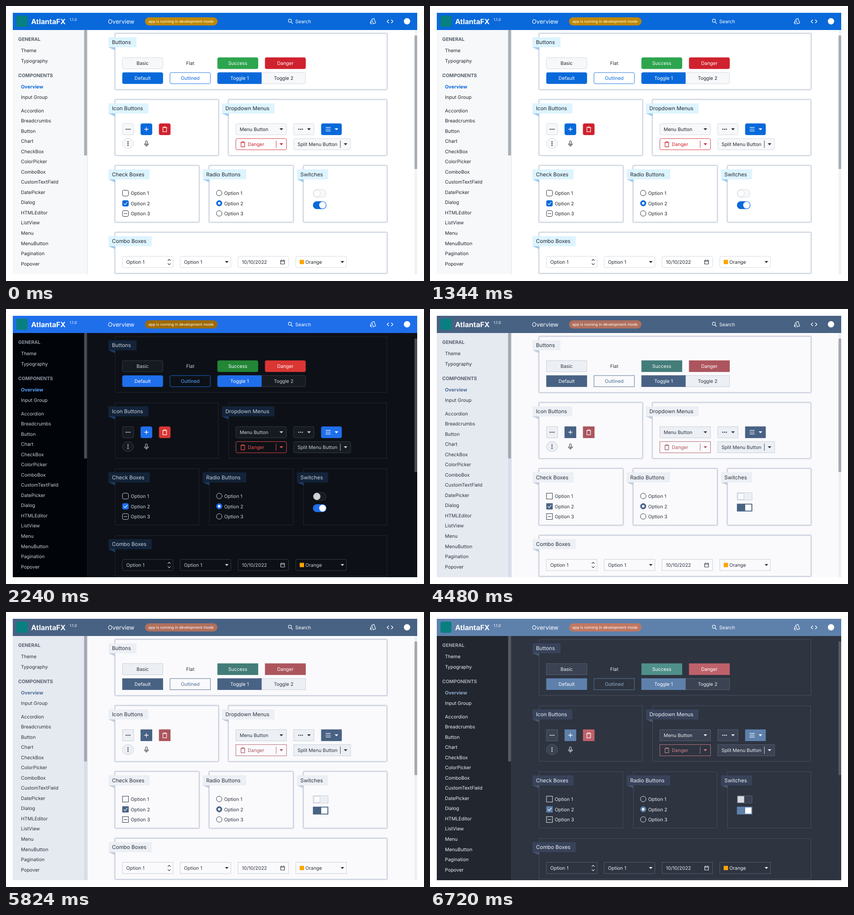
These frames come from a looping animation (923 px wide and 607 px high, 8960 ms). An HTML page:

```html
<!DOCTYPE html>
<html lang="en">
<head>
<meta charset="utf-8">
<title>Theme showcase</title>
<style>
html, body { margin: 0; width: 100%; height: 100%; overflow: hidden; background: #fff; }
svg { display: block; width: 923px; height: 607px; }
text { font-family: Inter, "Noto Sans", sans-serif; font-size: 10.5px; fill: var(--fg); text-rendering: geometricPrecision; white-space: pre; }
rect.ctl { rx: var(--r); }
.card { fill: var(--bg); stroke: var(--cardLine); filter: drop-shadow(0 0 1.5px var(--shadow)); }
</style>
</head>
<body>
<svg id="stage" viewBox="0 0 923 607" xmlns="http://www.w3.org/2000/svg"></svg>
<script>
const NS = 'http://www.w3.org/2000/svg';
const HOLD = 2240;
const stage = document.getElementById('stage');
const v = name => `var(--${name})`;

const themes = [
  { bg: '#ffffff', side: '#f6f8fa', sideTrack: '#f6f8fa', line: '#d0d7de', divider: '#d8dee4',
    fg: '#24292f', muted: '#57606a', head: '#0969da', accent: '#0969da', accentFg: '#0969da',
    ok: '#2da44e', bad: '#cf222e', badFg: '#cf222e', badge: '#bf8700', btn: '#f6f8fa',
    tag: '#ddf4ff', fold: '#9cc8ee', cardLine: '#cbd3df', shadow: '#8798b3', thumb: '#a9afb5',
    track: '#f0f2f4', knob: '#ffffff', knobLine: '#d0d7de', r: '3px', round: true },
  { bg: '#0d1117', side: '#010409', sideTrack: '#010409', line: '#3a4049', divider: '#21262d',
    fg: '#c9d1d9', muted: '#8b949e', head: '#1f6feb', accent: '#1f6feb', accentFg: '#58a6ff',
    ok: '#238636', bad: '#da3633', badFg: '#f85149', badge: '#9e6a03', btn: '#161b22',
    tag: '#132339', fold: '#1c3c69', cardLine: '#262b32', shadow: 'transparent', thumb: '#484c53',
    track: '#0d1117', knob: '#d0d1d3', knobLine: '#d0d1d3', r: '3px', round: true },
  { bg: '#fafafc', side: '#e5e9f0', sideTrack: '#d8dee9', line: '#c3cad6', divider: '#d8dee9',
    fg: '#2e3440', muted: '#5a6373', head: '#486284', accent: '#486284', accentFg: '#4c6a94',
    ok: '#437c78', bad: '#ac555d', badFg: '#ac555d', badge: '#b0705d', btn: '#eceff4',
    tag: '#eceff4', fold: '#c1cbdc', cardLine: '#c5cddd', shadow: '#8795b2', thumb: '#a3a8b1',
    track: '#eceff4', knob: '#fafafc', knobLine: '#c3cad6', r: '0px', round: false },
  { bg: '#2e3440', side: '#22262f', sideTrack: '#22262f', line: '#5a6477', divider: '#3b4252',
    fg: '#eceff4', muted: '#a5abb6', head: '#5e81ac', accent: '#5e81ac', accentFg: '#8daccf',
    ok: '#50908a', bad: '#bf616a', badFg: '#d08088', badge: '#c07762', btn: '#3b4252',
    tag: '#38435a', fold: '#49566d', cardLine: '#495265', shadow: 'transparent', thumb: '#565b66',
    track: '#2e3440', knob: '#d8dadd', knobLine: '#d8dadd', r: '0px', round: false }
];

let parent = stage;

function el(tag, attrs) {
  const node = document.createElementNS(NS, tag);
  for (const key in attrs) node.setAttribute(key, attrs[key]);
  parent.appendChild(node);
  return node;
}
const rect = (x, y, width, height, fill, more) => el('rect', { x, y, width, height, fill, ...more });
const dot = (cx, cy, r, fill, more) => el('circle', { cx, cy, r, fill, ...more });
const path = (d, stroke, more) => el('path', { d, fill: 'none', stroke, 'stroke-width': 1.1, ...more });
const shape = (d, fill) => el('path', { d, fill });

// Text placed by the middle of its capitals.
function label(str, x, cy, fill, size = 10.5, more = {}) {
  const node = el('text', { x, y: cy + size * 0.364, ...more });
  node.style.fontSize = size + 'px';
  node.style.fill = fill || v('fg');
  node.textContent = str;
}
const centred = (str, x, cy, fill) => label(str, x, cy, fill, 10.5, { 'text-anchor': 'middle' });

function control(x, y, w, fill, line, h = 25.5) {
  return rect(x + 0.4, y + 0.4, w - 0.8, h - 0.8, fill, { class: 'ctl', stroke: line || fill, 'stroke-width': 0.9 });
}
function button(str, x, y, fill, line, color) {
  control(x, y, 90, fill, line);
  centred(str, x + 45, y + 12.8, color);
}
const arrow = (x, y, fill = v('fg')) => shape(`M${x - 4} ${y - 2}h8l-4 4.2z`, fill);

function dots(x, y, vertical) {
  for (const k of [-4, 0, 4]) dot(vertical ? x : x + k, vertical ? y + k : y, 1.25, v('fg'));
}
function trash(x, y, color) {
  path(`M${x - 5.2} ${y - 3.6}h10.4M${x - 2} ${y - 3.8}v-1.7h4v1.7M${x - 4} ${y - 3.4}v9h8v-9`, color, { 'stroke-width': 1.2 });
}

function card(title, x, y, w, h, tagWidth) {
  rect(x, y, w, h, '', { class: 'card', 'stroke-width': 0.9 });
  shape(`M${x - 15} ${y + 30}h15v6.5z`, v('fold'));
  rect(x - 14.7, y + 8, tagWidth, 22.2, v('tag'));
  label(title, x - 7, y + 19, v('fg'), 11.6);
}

function drawHeader() {
  rect(15, 15, 893, 38, v('head'));
  rect(23, 21.3, 24.5, 24.7, '#087f80', { rx: 4 });
  label('AtlantaFX', 55.5, 34, '#fff', 15.75, { 'font-weight': 700 });
  label('1.1.0', 140.5, 30.2, '#fff', 8.4);
  label('Overview', 225, 34, '#fff', 13.125);
  rect(307, 25, 160, 18, v('badge'), { rx: 9 });
  label('app is running in development mode', 314.3, 34, '#fff', 8.4);
  dot(626.8, 32.6, 3.4, 'none', { stroke: '#fff', 'stroke-width': 1.2 });
  path('M629.3 35.2l3.7 3.7', '#fff', { 'stroke-width': 1.3 });
  label('Search', 638.7, 34, '#fff');
  path('M807.5 29.2l5.2-1.6 3.4 9.8-5.2 1.9zM806 31.2v8.2l2.2.6M804.5 35v3.6', '#fff', { 'stroke-width': 1.2 });
  path('M845.4 30.2l-3.8 3.8 3.8 3.8M850.6 30.2l3.8 3.8-3.8 3.8', '#fff', { 'stroke-width': 1.4 });
  dot(885.5, 33.7, 7, '#fff');
}

function drawSidebar() {
  rect(15, 53, 165, 539, v('side'));
  rect(172.5, 53, 7.5, 539, v('sideTrack'));
  rect(179.3, 53, 0.9, 539, v('divider'));
  rect(172.5, 53, 6.3, 277, v('thumb'), { rx: 1.5 });
  const bold = { 'font-weight': 700 };
  label('GENERAL', 27, 72.7, v('muted'), 10.5, bold);
  label('Theme', 33, 98.5);
  label('Typography', 33, 121);
  label('COMPONENTS', 27, 152.7, v('muted'), 10.5, bold);
  label('Overview', 33, 178.2, v('accentFg'), 10.5, bold);
  label('Input Group', 33, 200.7);
  ['Accordion', 'Breadcrumbs', 'Button', 'Chart', 'CheckBox', 'ColorPicker', 'ComboBox',
    'CustomTextField', 'DatePicker', 'Dialog', 'HTMLEditor', 'ListView', 'Menu',
    'MenuButton', 'Pagination', 'Popover'
  ].forEach((name, i) => label(name, 33, 230.8 + i * 22.53));
}

function drawButtons() {
  card('Buttons', 241, 61, 600, 123, 62);
  button('Basic', 256.7, 113.5, v('btn'), v('line'));
  centred('Flat', 406.8, 126.3);
  button('Success', 466.8, 113.5, v('ok'), null, '#fff');
  button('Danger', 571.8, 113.5, v('bad'), null, '#fff');
  button('Default', 256.7, 146.5, v('accent'), null, '#fff');
  button('Outlined', 361.7, 146.5, v('bg'), v('accent'), v('accentFg'));
  control(466.8, 146.5, 195, v('btn'), v('line'));
  control(466.8, 146.5, 97.5, v('accent'));
  rect(560, 146.5, 4.3, 25.5, v('accent'));
  centred('Toggle 1', 515.7, 159.3, '#fff');
  centred('Toggle 2', 613, 159.3);
}

function drawIconButtons() {
  card('Icon Buttons', 241, 207, 228, 122.5, 88);
  control(256.7, 259.3, 25.6, v('btn'), v('line'));
  dots(269.5, 272);
  control(297.2, 259.3, 25.6, v('accent'));
  path('M305.5 272h9M310 267.5v9', '#fff', { 'stroke-width': 1.3 });
  control(337.7, 259.3, 25.6, v('bad'));
  trash(350.5, 272, '#fff');
  el('ellipse', { cx: 269.4, cy: 303.7, rx: 12.4, ry: 11.2, fill: v('btn'), stroke: v('line'), 'stroke-width': 0.9 });
  dots(269.4, 303.7, true);
  rect(308, 297.7, 4, 7.8, 'none', { rx: 2, stroke: v('fg'), 'stroke-width': 1.1 });
  path('M305.5 303.5a4.5 4.3 0 0 0 9 0M310 307.8v2.6', v('fg'), { 'stroke-width': 1.2 });
}

function drawMenus() {
  card('Dropdown Menus', 491.5, 207, 349, 122.5, 116);
  control(507.2, 259.3, 112.6, v('btn'), v('line'));
  label('Menu Button', 516, 272.2);
  arrow(608, 272);
  control(634.8, 259.3, 45.8, v('btn'), v('line'));
  dots(650.5, 272);
  arrow(669, 272);
  control(695.8, 259.3, 45.6, v('accent'));
  path('M705.8 268.2h11M705.8 272h11M705.8 275.8h11', '#fff', { 'stroke-width': 1.2 });
  arrow(729.7, 272, '#fff');
  control(507.2, 292.3, 112.6, v('bg'), v('badFg'));
  trash(523, 305, v('badFg'));
  label('Danger', 534, 305.2, v('badFg'));
  rect(596, 297, 0.9, 16, v('badFg'));
  arrow(608, 305, v('badFg'));
  control(634.8, 292.3, 126.6, v('btn'), v('line'));
  label('Split Menu Button', 643.7, 305.2);
  rect(737.8, 297, 0.9, 16, v('fg'));
  arrow(749.8, 305);
}

function drawChoices() {
  card('Check Boxes', 241, 352.5, 185, 124.3, 91);
  card('Radio Buttons', 449, 352.5, 185, 124.3, 96);
  [413, 435.6, 458.1].forEach((y, i) => {
    const on = i === 1;
    rect(257.2, y - 6.4, 13.2, 12.8, on ? v('accent') : v('bg'),
      { class: 'ctl', stroke: on ? v('accent') : v('fg'), 'stroke-width': 1 });
    if (on) path(`M260 ${y}l3 3 5-6`, '#fff', { 'stroke-width': 1.3 });
    if (i === 2) path(`M260.2 ${y}h7.2`, v('fg'));
    label('Option ' + (i + 1), 275.5, y + 0.2);

    dot(470.8, y - 0.2, 6.1, on ? v('accent') : v('bg'), { stroke: on ? v('accent') : v('fg'), 'stroke-width': 1 });
    if (on) dot(470.8, y - 0.2, 2.8, '#fff');
    label('Option ' + (i + 1), 481.7, y + 0.2);
  });
}

let roundSwitches, squareSwitches;
function drawSwitches() {
  card('Switches', 657, 352.5, 184, 124.3, 69);
  const knobLine = { stroke: v('knobLine'), 'stroke-width': 0.9 };
  const edge = { stroke: v('line'), 'stroke-width': 0.9 };
  roundSwitches = el('g');
  squareSwitches = el('g');

  parent = roundSwitches;
  rect(678.2, 405.3, 29, 16.8, v('btn'), { rx: 8.4, ...edge });
  dot(686.5, 413.7, 7.5, v('knob'), knobLine);
  rect(677.7, 431, 30, 17.2, v('accent'), { rx: 8.6 });
  dot(699, 439.6, 7.5, '#fff');

  parent = squareSwitches;
  rect(678.2, 405.4, 33, 16.4, v('btn'), edge);
  rect(679.7, 406.9, 13.5, 13.4, v('knob'), knobLine);
  rect(677.7, 429.7, 34, 17.2, v('accent'));
  rect(696, 431.5, 13.7, 13.6, '#fff');
  parent = stage;
}

function drawCombos() {
  card('Combo Boxes', 241, 500, 600, 89.7, 95.5);
  for (let i = 0; i < 4; i++) control(256.7 + i * 127.6, 552.2, 112.6, v('bg'), v('line'));
  label('Option 1', 265.5, 565.2);
  path('M357.3 562l3-3 3 3M357.3 568.2l3 3 3-3', v('fg'));
  label('Option 1', 393, 565.2);
  arrow(487.5, 565);
  label('10/10/2022', 521, 565.2);
  path('M606.5 561.5h8.6v8h-8.6zM606.5 564h8.6M608.6 561.5v-1.5M613 561.5v-1.5', v('fg'));
  rect(648.5, 560.3, 9.6, 9.5, '#ffa500');
  label('Orange', 661, 565.2);
  arrow(742.8, 565);
}

function build() {
  rect(15, 15, 893, 577, v('bg'));
  drawSidebar();
  drawButtons();
  drawIconButtons();
  drawMenus();
  drawChoices();
  drawSwitches();
  drawCombos();
  rect(902, 53, 6, 539, v('track'));
  rect(902, 65, 6, 295, v('thumb'), { rx: 1.5 });
  drawHeader();
}

let shown = -1;
function render(ms) {
  const index = Math.floor(ms / HOLD) % themes.length;
  if (index === shown) return;
  shown = index;
  const theme = themes[index];
  for (const key in theme) stage.style.setProperty('--' + key, theme[key]);
  roundSwitches.style.display = theme.round ? '' : 'none';
  squareSwitches.style.display = theme.round ? 'none' : '';
}

build();
render(0);
const start = performance.now();
function tick() {
  render(performance.now() - start);
  requestAnimationFrame(tick);
}
requestAnimationFrame(tick);
</script>
</body>
</html>
```
